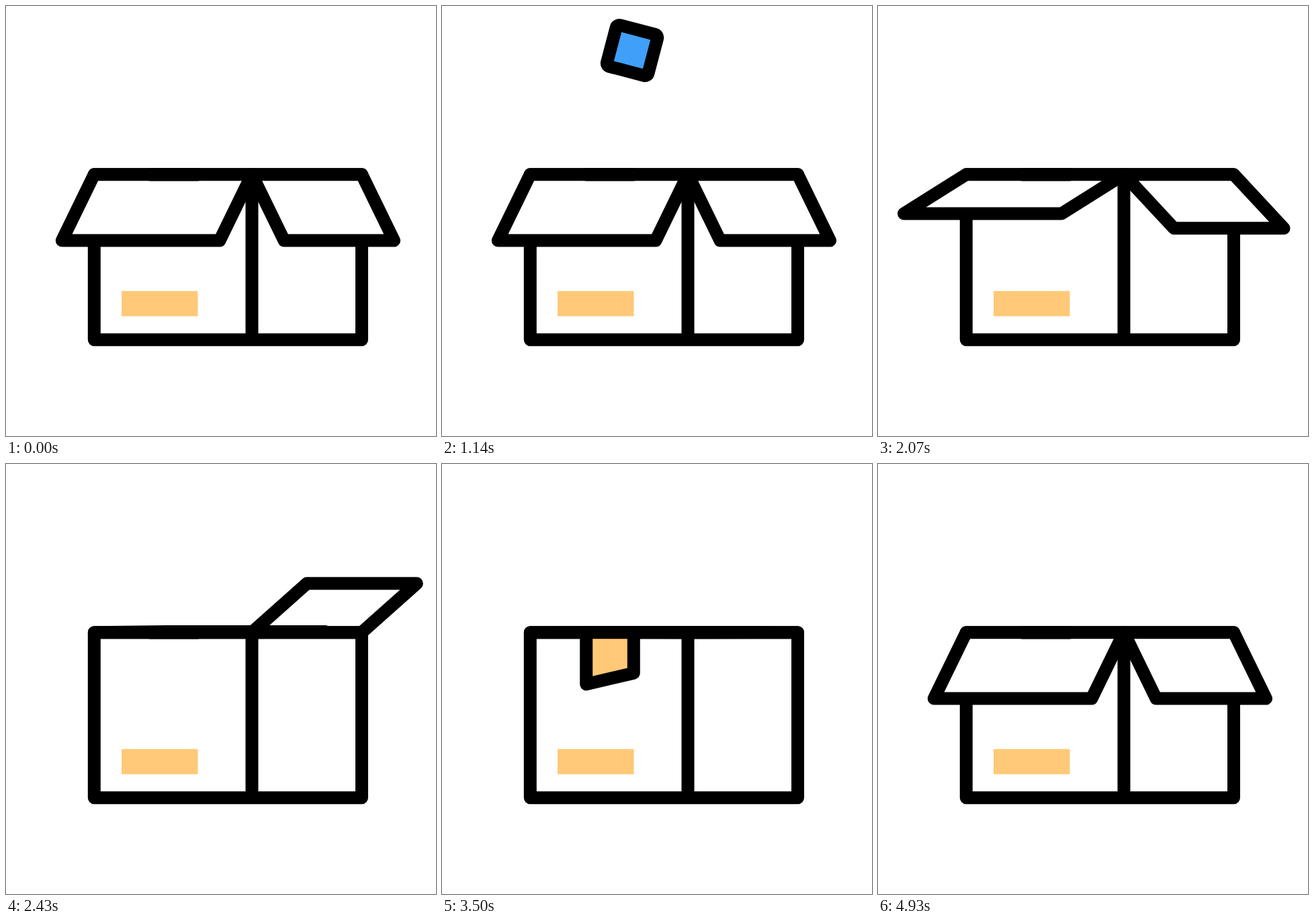
Write an HTML page without scripts that moves like this. It is 640 by 640 pixels and loops after 5 s.

```html
<!DOCTYPE html>
<html lang="en">
<head>
<meta charset="utf-8">
<title>Packing a box</title>
<style>
@property --a { syntax: '<angle>'; inherits: false; initial-value: -64deg; }
@property --p { syntax: '<number>'; inherits: false; initial-value: .003; }

html, body { margin: 0; width: 100%; height: 100%; overflow: hidden; background: #fff; }
svg { display: block; width: 100%; height: 100%; }

.ink { fill: none; stroke: #000; stroke-width: 19; stroke-linejoin: round; stroke-linecap: round; }
.label { fill: #ffc977; }

/* cubes hop out of the box and drop back in */
.cube { fill: #409ff9; animation: 5s linear infinite; }
.one { animation-name: hop1, spin1; }
.two { animation-name: hop2, spin2; }
@keyframes hop1 {
  0% { translate: 415px 300px; animation-timing-function: cubic-bezier(.333, .667, .667, 1); }
  11.4% { translate: 283px 73px; animation-timing-function: cubic-bezier(.333, 0, .667, .333); }
  22.8%, 100% { translate: 191px 304px; }
}
@keyframes spin1 {
  0% { rotate: 143deg; }
  22.8%, 100% { rotate: -142deg; }
}
@keyframes hop2 {
  0%, 14% { translate: 415px 304px; animation-timing-function: cubic-bezier(.333, .667, .667, 1); }
  23% { translate: 283px 66px; animation-timing-function: cubic-bezier(.333, 0, .667, .333); }
  32.8%, 100% { translate: 191px 304px; }
}
@keyframes spin2 {
  0%, 14% { rotate: 125deg; }
  32.8%, 100% { rotate: -110deg; }
}

/* a flap is a unit parallelogram whose free edge circles its hinge:
   --a angle, --s side, --r reach once past upright */
.flap {
  fill: #fff;
  vector-effect: non-scaling-stroke;
  fill-opacity: calc(sin(var(--a)) * -99);
  transform: translate(var(--x), 250.7px) matrix(1, 0,
    calc(var(--s) * (max(cos(var(--a)), 0) * 109.5 + min(cos(var(--a)), 0) * var(--r))),
    calc(sin(var(--a)) * -109.5), 0, 0);
  animation: 5s linear infinite;
}
.left { --x: 131.3px; --s: -1; --r: 109.5; animation-name: left; }
.right { --x: 366px; --s: 1; --r: 84; animation-name: right; }
@keyframes left {
  0%, 32.8% { --a: -64deg; }
  34.2% { --a: -56.6deg; }
  41.4% { --a: -32.6deg; }
  42.9% { --a: 1deg; }
  44.3% { --a: 40.5deg; }
  45.8% { --a: 130deg; }
  47.2% { --a: 165deg; }
  48.6% { --a: 179.3deg; }
  50%, 80.6% { --a: 179.9deg; }
  83% { --a: 174deg; }
  84.4% { --a: 160deg; }
  85.8% { --a: 128deg; }
  87.2% { --a: 84.8deg; }
  88.6% { --a: 38deg; }
  90% { --a: -10deg; }
  91.4% { --a: -36deg; }
  92.8% { --a: -50deg; }
  95.6% { --a: -61deg; }
  98.6%, 100% { --a: -64deg; }
}
@keyframes right {
  0%, 37.1% { --a: -64deg; }
  38.6% { --a: -56.6deg; }
  45.7% { --a: -32.6deg; }
  47.2% { --a: 1deg; }
  48.6% { --a: 40.5deg; }
  50.1% { --a: 130deg; }
  51.5% { --a: 165deg; }
  52.9%, 82.8% { --a: 179.9deg; }
  85.8% { --a: 168deg; }
  87.2% { --a: 147.5deg; }
  88.6% { --a: 95deg; }
  90% { --a: 15deg; }
  91.4% { --a: -32.6deg; }
  92.8% { --a: -50deg; }
  95.6% { --a: -61deg; }
  98.6%, 100% { --a: -64deg; }
}

/* tape rolls down the front */
.tape {
  fill: #ffc977;
  vector-effect: non-scaling-stroke;
  transform: translate(0, 250.7px) scale(1, var(--p));
  animation: tape 5s linear infinite;
}
@keyframes tape {
  0%, 57.2% { --p: .003; animation-timing-function: ease-in-out; }
  70%, 80.6% { --p: 1; }
  87.2% { --p: .27; }
  90%, 100% { --p: .003; }
}
</style>
</head>
<body>
<svg viewBox="0 0 640 640">
  <clipPath id="above"><path d="M0 0H640V250H0z"/></clipPath>
  <g class="ink">
    <g clip-path="url(#above)">
      <rect class="cube one" x="-31.75" y="-31.75" width="63.5" height="63.5" rx="5"/>
      <rect class="cube two" x="-31.75" y="-31.75" width="63.5" height="63.5" rx="5"/>
    </g>
    <path d="M131.3 250.7H529.5V496.7H131.3zM366 250.7v246"/>
    <path class="flap left" d="M0 0H234.7V1H0z" transform-origin="0 0"/>
    <path class="flap right" d="M0 0H163.5V1H0z" transform-origin="0 0"/>
    <path class="tape" d="M214.7 0V77L285.3 60.5V0z"/>
  </g>
  <path class="label" d="M172 424.2h113.5v37.5H172z"/>
</svg>
</body>
</html>
```
